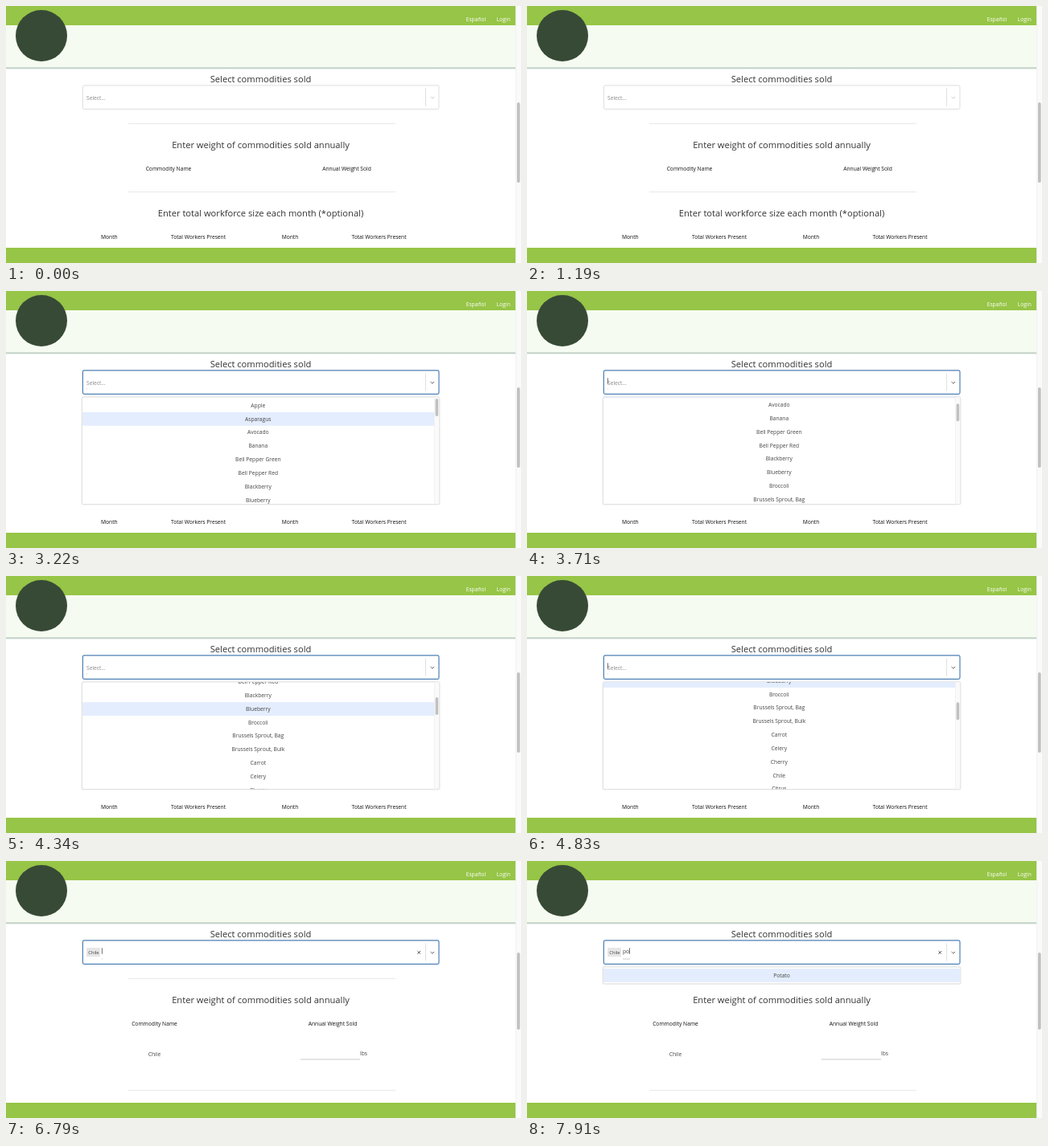
Animation, 640 px wide and 320 px high, one loop 8000 ms. Source, as an HTML page:

```html
<!DOCTYPE html>
<html lang="en">
<head>
<meta charset="utf-8">
<title>Select commodities sold</title>
<style>
html, body { margin: 0; width: 100%; height: 100%; overflow: hidden; background: #fff; }
svg { display: block; width: 100vw; height: 100vh; }
text { font: 6.7px "Open Sans", sans-serif; fill: #444; }
.mid { text-anchor: middle; }
.title { font-size: 11.15px; fill: #333; }
.th { font-weight: 500; fill: #111; }
.nav { fill: #fff; }
.hr { stroke: #e4e4e4; stroke-width: .8; }
.thumb { fill: #c1c1c1; }
</style>
</head>
<body>
<svg viewBox="0 0 640 320">
  <defs>
    <clipPath id="clip"><rect x="94" y="132" width="446" height="133.3"/></clipPath>
    <linearGradient id="shade" x2="0" y2="1">
      <stop stop-color="#7f9c8c" stop-opacity=".75"/><stop offset="1" stop-color="#7f9c8c" stop-opacity="0"/>
    </linearGradient>
  </defs>
  <rect width="640" height="320" fill="#fff"/>

  <text class="mid title" x="316.5" y="94.5">Select commodities sold</text>
  <path class="hr" d="M152 146.5H484"/>
  <text class="mid title" x="316.5" y="176.8">Enter weight of commodities sold annually</text>
  <g id="before">
    <text class="mid th" x="202" y="204.8">Commodity Name</text>
    <text class="mid th" x="423.5" y="204.8">Annual Weight Sold</text>
    <path class="hr" d="M152 231.5H484"/>
    <text class="mid title" x="316.5" y="261.8">Enter total workforce size each month (*optional)</text>
    <text class="mid th" x="128.3" y="289.8">Month</text>
    <text class="mid th" x="239" y="289.8">Total Workers Present</text>
    <text class="mid th" x="353" y="289.8">Month</text>
    <text class="mid th" x="463.5" y="289.8">Total Workers Present</text>
  </g>
  <g id="after">
    <text class="mid th" x="184.5" y="204.8">Commodity Name</text>
    <text class="mid th" x="406" y="204.8">Annual Weight Sold</text>
    <text class="mid" x="184.5" y="242.8">Chile</text>
    <path d="M366 247H440" stroke="#aaa" stroke-width=".6"/>
    <text x="440" y="242.3">lbs</text>
    <path class="hr" d="M152 285.5H484"/>
  </g>

  <rect id="box" x="95.4" y="98.9" width="442.6" height="29.5" rx="1.8" fill="#fff"/>
  <path d="M521.5 102.5V124.5" stroke="#ccc" stroke-width=".6"/>
  <path id="chevron" d="M527.5 113L529.8 115.2L532.1 113" fill="none" stroke-width="1"/>
  <text id="hint" x="100" y="116.5" style="fill:#8a8a8a">Select...</text>
  <g id="chip">
    <rect x="100" y="108" width="17" height="11.3" rx=".8" fill="#e6e6e6"/>
    <text x="102.3" y="115.7" style="font-size:5.7px">Chile</text>
    <path d="M511.4 112L515 115.6M515 112L511.4 115.6" stroke="#555" stroke-width="1"/>
  </g>
  <text id="typed" x="119" y="114.8"></text>
  <path id="rule" stroke="#aaa" stroke-width=".6"/>
  <path id="caret" stroke="#333" stroke-width=".7"/>

  <g id="menu">
    <rect id="halo" x="94.2" y="132.2" width="444.8" rx="2" fill="none" stroke="#000" stroke-opacity=".05" stroke-width="1.8"/>
    <rect id="panel" x="94.6" y="132" width="444" rx="1.6" fill="#fff" stroke="#d2d2d2" stroke-width=".6"/>
    <g clip-path="url(#clip)">
      <rect id="mark" x="95" height="16.8" fill="#e4edfd"/>
      <g id="rows"></g>
    </g>
    <g id="bar">
      <rect x="532.4" y="132.4" width="5.8" height="132.8" fill="#fafafa"/>
      <path d="M532.4 132.4V265" stroke="#e6e6e6" stroke-width=".5"/>
      <rect id="knob" class="thumb" x="533.6" width="3.6" height="22" rx="1.8"/>
    </g>
  </g>

  <rect y="24" width="633.5" height="53" fill="#f5fbf0"/>
  <rect y="76.6" width="633.5" height="2.4" fill="url(#shade)"/>
  <rect width="633.5" height="24" fill="#96c547"/>
  <rect y="301" width="633.5" height="19" fill="#96c547"/>
  <text class="nav" x="571.7" y="19">Español</text>
  <text class="nav" x="609.8" y="19">Login</text>
  <circle cx="44" cy="37" r="32" fill="#374a36"/>

  <rect x="633.5" width="6.5" height="320" fill="#fafafa"/>
  <path d="M633.7 0V320" stroke="#e6e6e6" stroke-width=".5"/>
  <rect id="page" class="thumb" x="635" width="3.7" rx="1.8"/>
</svg>
<script>
const $ = id => document.getElementById(id);
const set = (id, attrs) => { for (const k in attrs) $(id).setAttribute(k, attrs[k]); };
const show = (id, on) => { $(id).style.display = on ? '' : 'none'; };

const LOOP = 8000, STEP = 70, ROW = 16.82;
const OPEN = 2520, PICK = 6440, TYPE_P = 7770, TYPE_PO = 7910;
const all = ['Apple', 'Asparagus', 'Avocado', 'Banana', 'Bell Pepper Green', 'Bell Pepper Red',
  'Blackberry', 'Blueberry', 'Broccoli', 'Brussels Sprout, Bag', 'Brussels Sprout, Bulk', 'Carrot',
  'Celery', 'Cherry', 'Chile', 'Citrus', 'Cucumber, Euro/Mini', 'Cucumber, Field/Slicer',
  'Eggplant', 'Grape', 'Pea', 'Potato'];
const hovers = [[0, 0], [3080, 1], [4340, 7], [5530, 12], [5600, 13], [5670, 14], [TYPE_P, 0]];

// Flick scroll: quick start, long settle
function flick(t, start, a, b) {
  const u = Math.min(1, Math.max(0, (t - start) / 700));
  return 1 - (1 - u ** a) ** b;
}

let listed;
function fill(list, x) {
  const key = list.join();
  if (key === listed) return;
  listed = key;
  $('rows').innerHTML = list.map((name, i) =>
    `<text class="mid" x="${x}" y="${144.8 + i * ROW}">${name}</text>`).join('');
}

function draw(t) {
  const picked = t >= PICK;
  const word = t >= TYPE_PO ? 'po' : t >= TYPE_P ? 'p' : '';
  const focus = t > OPEN;
  const open = t >= OPEN && !picked || word;
  const scroll = picked ? 0 : 94.7 * flick(t, 3500, 1.4, 2.2) + 69.3 * flick(t, 4620, 1.3, 3);

  show('before', !picked);
  show('after', picked);
  show('hint', !picked);
  show('chip', picked);
  set('page', picked ? { y: 114, height: 96 } : { y: 120, height: 100 });
  set('box', {
    stroke: focus ? '#4d80b4' : t >= OPEN ? '#b5b5b5' : '#d0d0d0',
    'stroke-width': focus ? 1.2 : .7
  });
  set('chevron', { stroke: focus ? '#666' : '#ccc' });

  // Input field
  const left = picked ? 119 : 100;
  const right = left + [0, 4.1, 8.1][word.length] + .4;
  $('typed').textContent = word;
  set('rule', { d: `M${left} 122H${right + .6}` });
  set('caret', { d: `M${right} 108.3V115.8` });
  show('rule', t >= OPEN);
  show('caret', t >= OPEN && (word || (t - 2470) % 1040 < 555));

  // Option list
  show('menu', open);
  if (!open) return;
  const list = all.filter(name => name.toLowerCase().includes(word) && !(picked && name === 'Chile'));
  const long = list.length > 7;
  fill(list, long ? 313.3 : 316.5);
  const height = long ? 133.6 : 20.8;
  set('panel', { height });
  set('halo', { height });
  set('rows', { transform: `translate(0 ${-scroll})` });
  const hover = hovers.filter(h => t >= h[0]).pop()[1];
  set('mark', { y: 134.1 + hover * ROW - scroll, width: long ? 437.3 : 443.6 });
  show('bar', long);
  set('knob', { y: 134 + scroll * .18 });
}

function frame(now) {
  draw(Math.floor(now % LOOP / STEP) * STEP);
  requestAnimationFrame(frame);
}
frame(performance.now());
</script>
</body>
</html>
```
